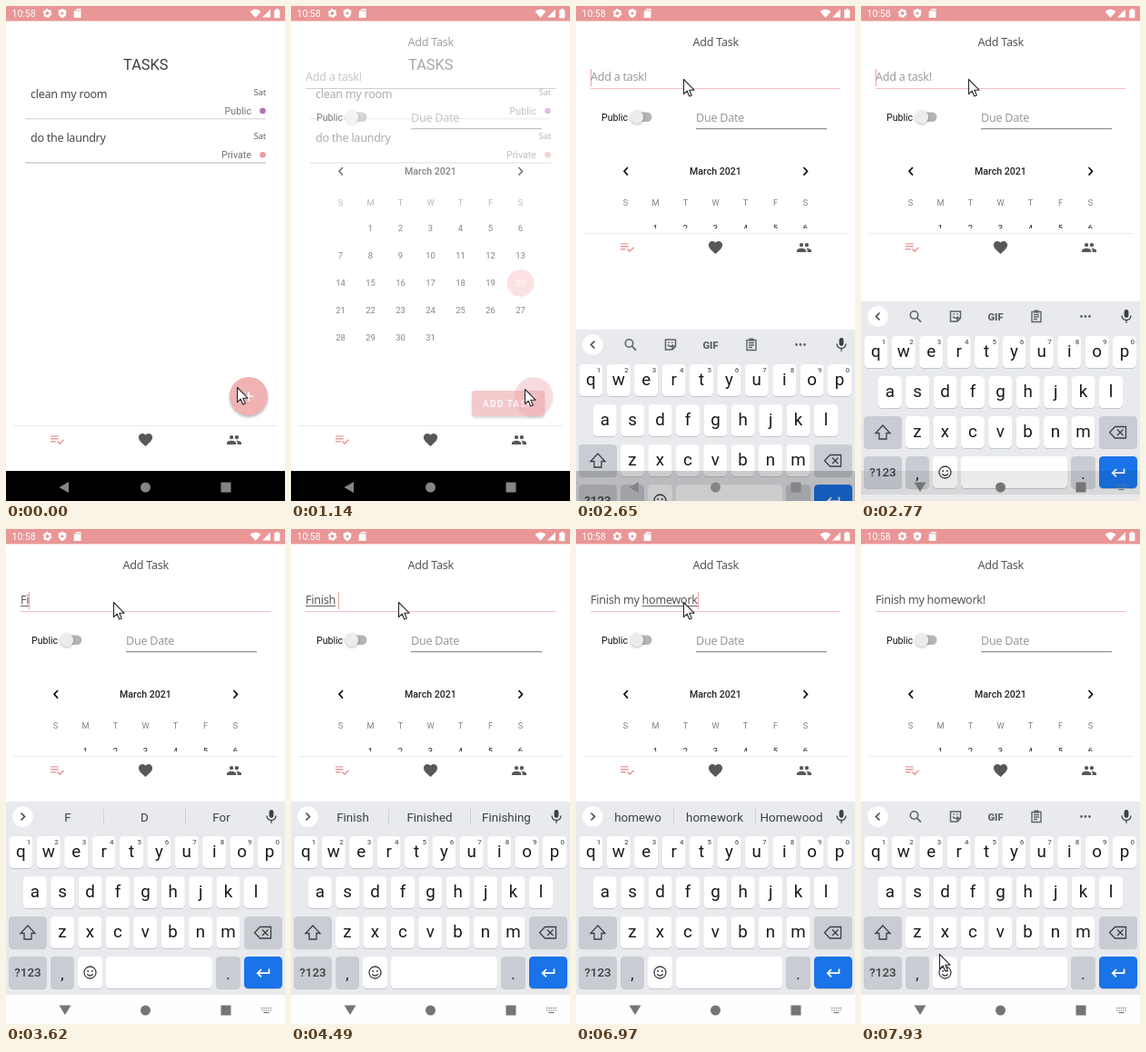
An HTML page that plays this animation: 307x543 px, repeating every 7.99 s.

```html
<!DOCTYPE html>
<html lang="en">
<head>
<meta charset="utf-8">
<title>Task app</title>
<style>
html, body { margin: 0; width: 100%; height: 100%; overflow: hidden; background: #fff; }
svg { display: block; width: 100vw; height: 100vh; }
text { font-family: Roboto, sans-serif; white-space: pre; }
.h { font-family: "Noto Sans", "Open Sans", sans-serif; letter-spacing: -.28px; }
</style>
</head>
<body>
<svg id="stage" viewBox="0 0 307 543" xmlns="http://www.w3.org/2000/svg"></svg>
<script>
const LOOP = 7990;
const PINK = '#e99a9c', KEY_INK = '#18191c', MOD_INK = '#3c4043', ICON = '#5f6368', NAV = '#757575';

// Markup helpers
const txt = (x, y, s, size, fill, more = '') =>
  `<text x="${x}" y="${y}" font-size="${size}" fill="${fill}" ${more}>${s}</text>`;
const mid = (x, y, s, size, fill, more = '') => txt(x, y, s, size, fill, 'text-anchor="middle" ' + more);
const end = (x, y, s, size, fill, more = '') => txt(x, y, s, size, fill, 'text-anchor="end" ' + more);
const box = (x, y, w, h, fill, more = '') =>
  `<rect x="${x}" y="${y}" width="${w}" height="${h}" fill="${fill}" ${more}/>`;
const dot = (x, y, r, fill, more = '') => `<circle cx="${x}" cy="${y}" r="${r}" fill="${fill}" ${more}/>`;
const fillPath = (d, fill, more = '') => `<path d="${d}" fill="${fill}" ${more}/>`;
const stroke = (d, color, w = 1.3, more = '') =>
  `<path d="${d}" fill="none" stroke="${color}" stroke-width="${w}" ${more}/>`;
const group = (id, body, more = '') => `<g id="${id}" ${more}>${body}</g>`;
const glyph = (d, x, y, k, fill) =>
  fillPath(d, fill, `transform="translate(${x} ${y}) scale(${k}) translate(-12 -12)"`);

const CHECKLIST = 'M14 10H2v2h12v-2zm0-4H2v2h12V6zM2 16h8v-2H2v2zm19.5-4.5L23 13l-7 7-4.5-4.5L13 14l3 3z';
const HEART = 'M12 21.35l-1.45-1.32C5.4 15.36 2 12.28 2 8.5 2 5.4 4.4 3 7.5 3c1.74 0 3.4.8 4.5 2.1C13.1 3.8 14.76 3 16.5 3 19.6 3 22 5.4 22 8.5c0 3.78-3.4 6.86-8.55 11.54z';
const PEOPLE = 'M16 11a3 3 0 1 0 0-6 3 3 0 0 0 0 6zM8 11a3 3 0 1 0 0-6 3 3 0 0 0 0 6zm0 2c-2.33 0-7 1.17-7 3.5V19h14v-2.5C15 14.2 10.3 13 8 13zm8 0l-1 .05c1.2.84 2 2 2 3.45V19h6v-2.5c0-2.3-4.7-3.5-7-3.5z';

function statusBar() {
  return box(0, 0, 307, 16.5, '#e99696') + txt(6.5, 11.8, '10:58', 10.5, '#fff') +
    dot(45.5, 8, 2.9, 'none', 'stroke="#fff" stroke-width="2"') +
    dot(45.5, 8, 4.2, 'none', 'stroke="#fff" stroke-width="1.4" stroke-dasharray="2.2"') +
    fillPath('M62 3l4.3 1.8v3c0 2.6-1.8 4.5-4.3 5.4-2.5-.9-4.3-2.8-4.3-5.4v-3z', '#fff') +
    dot(62, 8, 1.5, '#e99696') +
    fillPath('M78 3h4.5v10h-7.8V6.2z', '#fff') + stroke('M77.4 6V4.6M79.2 6V4M81 6V4', '#e99696', .8) +
    fillPath('M268.5 6q6-5 12 0l-6 7z', '#fff') + fillPath('M291 3.5v9h-9z', '#fff') +
    fillPath('M295.2 4.2h1.8V3h2.6v1.2h1.8v9h-6.2z', '#fff');
}

function listScreen() {
  const task = (y, name, who, color, line) =>
    txt(27, y, name, 12.6, '#484848', 'class="h"') +
    end(286, y - 3, 'Sat', 9.8, '#666', 'class="h"') +
    end(270, y + 17.5, who, 10.7, '#757575') + dot(282.5, y + 14, 3.3, color) +
    box(21, y + 22.3, 265, 1, line);
  return mid(153.8, 69.5, 'TASKS', 16.4, '#404040') +
    task(101, 'clean my room', 'Public', '#b66fb9', '#cfcfcf') +
    task(149.2, 'do the laundry', 'Private', '#eb9b9d', '#b4b4b4') +
    dot(267, 430, 21, '#000', 'opacity=".28" filter="url(#soft)"') + dot(267, 428, 21, '#f0b2b3') +
    stroke('M262 428h10M267 423v10', '#fff', 1.7);
}

function calendar() {
  const col = i => 54.5 + 33 * i;
  let s = stroke('M57 177l-4 4.3 4 4.3M250.5 177l4 4.3-4 4.3', '#111', 1.7) +
    mid(153.5, 185, 'March 2021', 10.6, '#222', 'font-weight="500"');
  [...'SMTWTFS'].forEach((d, i) => s += mid(col(i), 219.2, d, 9.2, '#808080'));
  for (let d = 1; d <= 31; d++) {
    const x = col(d % 7), y = 244 + 30 * Math.floor(d / 7);
    if (d === 20) s += dot(x, y, 15, '#f9cbcc');
    s += mid(x, y + 3.4, d, 9.4, d === 20 ? '#fff' : '#222');
  }
  return s;
}

function addScreen() {
  return mid(153.8, 44.3, 'Add Task', 12.6, '#555', 'class="h"') +
    box(16, 90, 275, 1, '#a8a8a8', 'id="rule"') +
    txt(16, 82, '', 12.6, '#555', 'id="field" class="h"') +
    box(16, 84, 0, 1, '#666', 'id="mark"') + box(16, 69, 1, 19, '#f0a0a4', 'id="caret"') +
    txt(28, 126, 'Public', 10.6, '#111') +
    box(61, 116.5, 22.5, 10.5, '#b4b4b4', 'rx="5.2"') +
    dot(67, 122.7, 7.4, '#000', 'opacity=".25" filter="url(#soft)"') + dot(67, 121.8, 7.2, '#ececec') +
    txt(132, 126.6, 'Due Date', 12.6, '#999', 'class="h"') + box(132, 134.2, 144, 1, '#777') +
    group('calendar', calendar()) +
    group('submit', box(199, 424, 80, 28, '#000', 'rx="3" opacity=".28" filter="url(#soft)"') +
      box(199, 422, 80, 28, '#ea9fa1', 'rx="3"') +
      txt(211, 440, 'ADD TASK', 10.2, '#fff', 'font-weight="500" letter-spacing="1.1"'));
}

function tabs() {
  return box(8, 460, 291, 1, '#ececec') + glyph(CHECKLIST, 56.2, 475.5, .72, PINK) +
    glyph(HEART, 153.5, 475.8, .76, '#585858') + glyph(PEOPLE, 251, 476, .73, '#585858');
}

function keyboard() {
  const MOD = '#c9ccd2';
  const key = (x, y, w, fill = '#fff') =>
    box(x, y + 1, w, 35, '#c3c6cb', 'rx="4.5"') + box(x, y, w, 35, fill, 'rx="4.5"');
  let s = box(0, 299, 307, 300, '#e8eaed') + box(0, 511, 307, 90, '#fefefe');
  const row = (letters, x0, y, nums) => [...letters].forEach((c, i) => {
    const x = x0 + 30.4 * i;
    s += key(x - 13, y, 26) + mid(x, y + 23.3, c, 18.8, KEY_INK, 'class="letter"');
    if (nums) s += mid(x + 8.7, y + 9, (i + 1) % 10, 8, ICON, 'font-weight="500"');
  });
  row('qwertyuiop', 16.4, 337, true);
  row('asdfghjkl', 31.8, 381);
  row('zxcvbnm', 62, 425);
  s += key(3, 425, 42, MOD) + key(262, 425, 42, MOD) + key(3, 469, 42, MOD) + key(49, 469, 26, MOD) +
    key(79, 469, 27) + key(110, 469, 117) + key(231, 469, 27, MOD) + key(262, 469, 42, '#1a73e8') +
    fillPath('M24 435l8 8.5h-4v6.5h-8v-6.5h-4z', 'none', `id="shift" stroke="${MOD_INK}" stroke-width="1.3"`) +
    stroke('M279.5 436.5h12v12.5h-12l-6-6.2zM282 439.5l6.5 6.5M288.5 439.5l-6.5 6.5', MOD_INK, 1.3) +
    mid(24, 491, '?123', 13.4, MOD_INK, 'font-weight="500"') + mid(62, 494, ',', 17, KEY_INK) +
    mid(244.5, 494, '.', 17, KEY_INK) +
    dot(92.5, 486.5, 6.5, 'none', `stroke="${MOD_INK}" stroke-width="1.3"`) +
    dot(90.2, 485, 1, MOD_INK) + dot(94.8, 485, 1, MOD_INK) +
    stroke('M89.2 488.3q3.3 3.4 6.6 0', MOD_INK, 1.3) +
    stroke('M289.5 482.5v4.7h-12.5M281 483l-4.3 4.2 4.3 4.2', '#fff', 1.7);

  // Strip above the keys: tools or word suggestions
  s += dot(18.5, 315.5, 11.2, '#fff') + stroke('M20.5 311.5l-4 4 4 4', MOD_INK, 1.5, 'id="chevron"');
  s += group('tools',
    dot(58.5, 314, 4.2, 'none', `stroke="${ICON}" stroke-width="1.6"`) + stroke('M61.5 317l4.5 4.7', ICON, 1.8) +
    stroke('M98.5 310h11v7.5l-3.5 3.5h-7.5zM109.5 317.5h-3.5v3.5M101 315.5q3 4 6 0M101.5 313h1.5M105 313h1.5', ICON, 1.5) +
    mid(148, 319.5, 'GIF', 11.2, ICON, 'font-weight="900"') +
    stroke('M188 310.5h10v11h-10zM190 313.5h6M190 316h6M190 318.5h4', ICON, 1.4) + box(190.5, 308.5, 5, 3, ICON) +
    [242.5, 247, 251.5].map(x => dot(x, 315.5, 1.4, ICON)).join(''));
  s += group('words', box(107, 307, 1, 17, '#cdd0d4') + box(197, 307, 1, 17, '#cdd0d4') +
    [68, 152.5, 237].map(x => mid(x, 320.5, '', 13.4, MOD_INK, 'class="word"')).join(''));
  return s + box(289.6, 308, 4.8, 9, MOD_INK, 'rx="2.4"') +
    stroke('M287 314.5q.5 5 5 5t5-5M292 319.5v3.2', MOD_INK, 1.3);
}

function navBar() {
  return box(0, 510, 307, 33, '#000', 'id="navBack"') +
    group('navIcons', '<path id="back"/><circle cx="153.5" cy="528" r="5.5"/>' +
      '<rect x="236.5" y="522.5" width="11" height="11"/>') +
    group('kbIcon', stroke('M281 525.5h11M281 528h11', NAV, 1.2, 'stroke-dasharray="1.4 1"') +
      stroke('M283.5 530.5h6', NAV, 1.2));
}

const stage = document.getElementById('stage');
stage.innerHTML =
  '<defs><filter id="soft" x="-40%" y="-40%" width="180%" height="180%"><feGaussianBlur stdDeviation="1.8"/></filter>' +
  '<clipPath id="short"><rect width="307" height="244"/></clipPath></defs>' +
  box(0, 0, 307, 543, '#fff') +
  group('list', listScreen()) + group('add', addScreen()) + group('tabs', tabs()) +
  group('keys', keyboard()) + navBar() + statusBar() +
  group('cursor', fillPath('M.5 .5v16.2l3.7-3.5 2.5 5.8 2.6-1.1-2.5-5.7h5.2z', '#fff',
    'stroke="#26262e" stroke-width="1.1" stroke-linejoin="round"'));

const $ = id => document.getElementById(id);
const letters = [...stage.querySelectorAll('.letter')];
const words = [...stage.querySelectorAll('.word')];
const set = (id, attrs) => { for (const k in attrs) $(id).setAttribute(k, attrs[k]); };
const show = (id, on) => set(id, { display: on ? 'inline' : 'none' });

// Timelines of [start, value]; a value holds until the next start
const at = (line, t) => line.reduce((v, [start, next]) => t >= start ? next : v, line[0][1]);
const TEXT = 'Finish my homework!'.replace(/ /g, '\u00a0');
const TYPED = [0, 3450, 3600, 3740, 3810, 3890, 4040, 4490, 4640, 4820, 4950, 5150, 5300, 5790,
  6550, 6640, 6730, 6800, 6880, 7270].map((t, i) => [t, i]);
const MARK = [[0, [0, 0]], [3520, [0, 1]], [3600, [0, 2]], [3810, [0, 4]], [3960, [0, 5]], [4220, [0, 6]],
  [4640, [0, 0]], [4820, [7, 9]], [4950, [0, 0]], [5300, [10, 11]], [5450, [10, 12]], [6070, [10, 13]],
  [6640, [10, 15]], [6880, [10, 18]], [7480, [0, 0]]];
const WORDS = [[0, ''], [3520, 'F|D|For'], [3740, 'Fi|Find|First'], [3960, 'Finis|Finish|Finished'],
  [4220, 'Finish|Finished|Finishing'], [4640, 'm|my|me'], [4820, 'my|myself|mine'], [4950, 'own|mind|favorite'],
  [5150, 'h|he|her'], [5300, 'h|homework|house'], [5450, 'ho|homework|house'], [6070, 'hom|home|homes'],
  [6640, 'home|homework|homes'], [6800, 'homewo|homework|Homewood'], [7150, 'homework|homeworks|Homewood'], [7480, '']];
const FADE = [[0, 0], [1080, .25], [1140, .55], [1200, .85], [1270, 1]];
const SLIDE = [[0, 244], [2560, 122], [2650, 56], [2710, 25], [2780, 9], [2850, 2], [2920, 0]];
const DIM = [[0, 1], [2560, .4], [2650, .2], [2710, .08], [2780, 0]];

// Pointer stops [time, x, y]
const POINTER = [[1590, 257, 420], [1740, 208, 300], [1850, 152, 180], [1920, 132, 140], [1990, 125, 112],
  [2130, 118, 80], [7600, 118, 80], [7660, 115, 112], [7790, 100, 300], [7860, 91, 410], [7930, 86, 466]];
function pointer(t) {
  if (t < 60) return [254, 418];
  if (t < 870) return [256, 419];
  const i = POINTER.findIndex(p => p[0] > t);
  if (i === 0) return [257, 420];
  if (i < 0) return [86, 466];
  const [a, b] = [POINTER[i - 1], POINTER[i]], k = (t - a[0]) / (b[0] - a[0]);
  return [a[1] + (b[1] - a[1]) * k, a[2] + (b[2] - a[2]) * k];
}

function drawField(t, focused) {
  const n = at(TYPED, t), field = $('field');
  field.textContent = n ? TEXT.slice(0, n) : 'Add a task!';
  set('field', { fill: n ? '#555' : '#9b9b9b' });
  const width = k => k && n ? field.getSubStringLength(0, Math.min(k, n)) : 0;
  const [from, to] = at(MARK, t);
  set('mark', { x: 16 + width(from), width: Math.max(0, width(to) - width(from)) });
  set('caret', { x: Math.round(16 + width(n)) });
  show('caret', focused && t < 7660);
  set('rule', { fill: focused ? '#f6bfc3' : '#a8a8a8' });
}

function drawKeyboard(t, up) {
  show('keys', up);
  set('keys', { transform: `translate(0 ${at(SLIDE, t)})` });
  const caps = t >= 3370 && t < 3520, list = at(WORDS, t);
  for (const el of letters) {
    el.textContent = caps ? el.textContent.toUpperCase() : el.textContent.toLowerCase();
  }
  set('shift', { fill: caps ? MOD_INK : 'none' });
  show('tools', !list);
  show('words', !!list);
  words.forEach((el, i) => el.textContent = list.split('|')[i] || '');
  set('chevron', { transform: list ? 'rotate(180 18.5 315.5)' : '' });
}

function render(t) {
  const up = t >= 2560, settled = t >= 2710, fade = at(FADE, t);
  set('list', { opacity: 1 - fade });
  set('add', { opacity: fade });
  set('calendar', { 'clip-path': up ? 'url(#short)' : 'none' });
  show('submit', !up);
  set('tabs', { transform: `translate(0 ${up ? -211 : 0})` });
  drawField(t, t >= 2440);
  drawKeyboard(t, up);
  set('navBack', { opacity: at(DIM, t) });
  set('navIcons', { fill: settled ? NAV : '#858585' });
  set('back', { d: settled ? 'M58.5 522.5h13l-6.5 10.5z' : 'M69 522v12l-10.5-6z' });
  show('kbIcon', settled);
  set('cursor', { transform: `translate(${pointer(t)})` });
}

function tick() {
  render(performance.now() % LOOP);
  requestAnimationFrame(tick);
}
tick();
</script>
</body>
</html>
```
